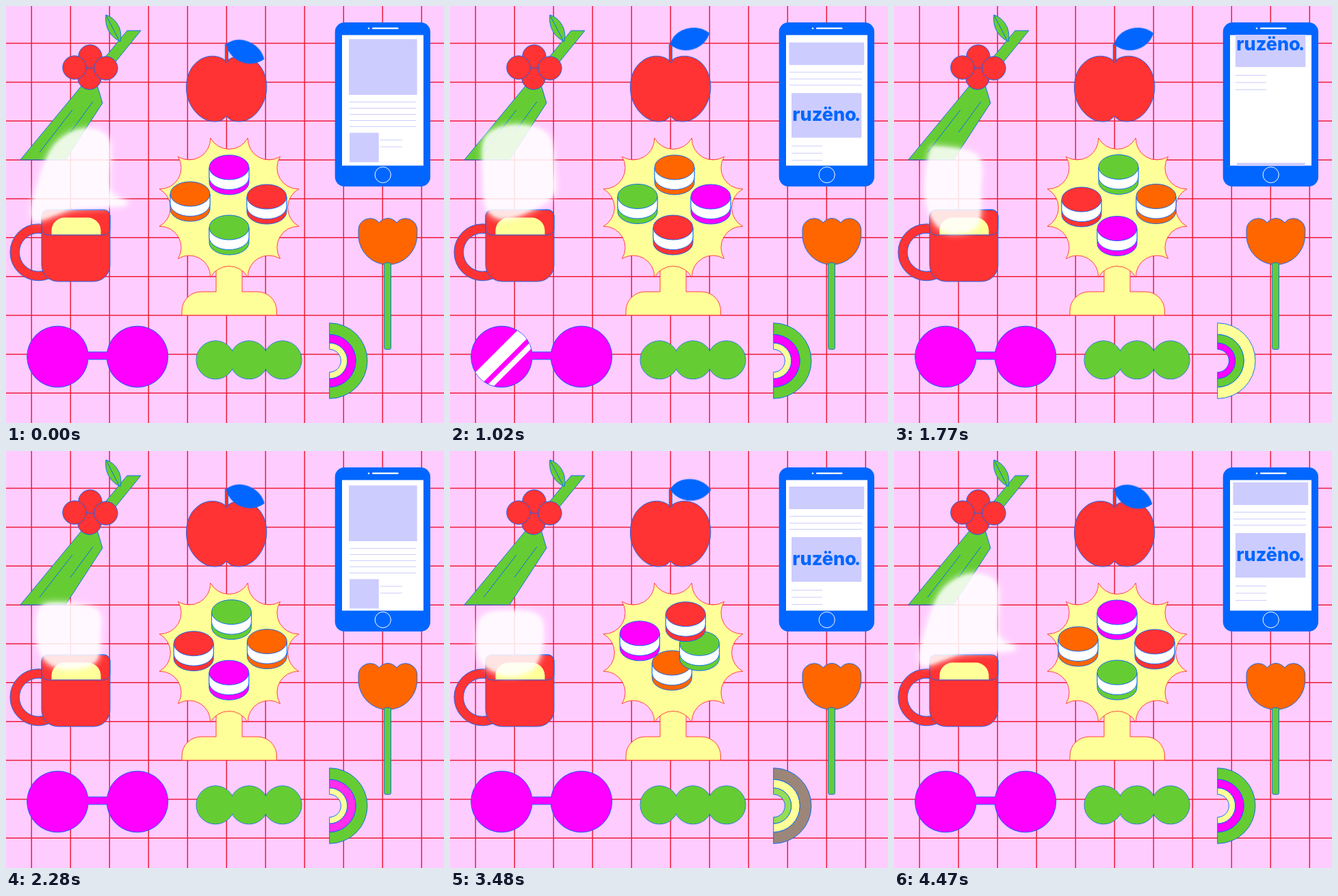
These frames come from a looping animation (640 px wide and 610 px high, 4.5 s). An HTML page:

```html
<!DOCTYPE html>
<html lang="en">
<head>
<meta charset="utf-8">
<title>Picnic stickers</title>
<style>
  html, body { margin: 0; width: 100%; height: 100%; overflow: hidden; background: #fcf; }
  svg { display: block; width: 640px; height: 610px; }
  .o { stroke: #06f; stroke-width: .9; }
  .red { fill: #f33; }
  .green { fill: #6c3; }
  .pink { fill: #f0f; }
  .blue { fill: #06f; }
  .cream { fill: #ff9; }
  .lilac { fill: #ccf; }
  .line { fill: none; stroke: #ccf; }
  .brand { font: 800 27px Inter, sans-serif; text-anchor: middle; }

  #leaf { transform-origin: 322px 56px; animation: flap 750ms infinite; }
  @keyframes flap {
    0% { transform: rotate(21.4deg); animation-timing-function: cubic-bezier(.37, 0, .63, 1); }
    36% { transform: rotate(-16deg); animation-timing-function: cubic-bezier(.37, 0, .63, 1); }
    96%, 100% { transform: rotate(21.4deg); }
  }

  #feed { animation: scroll 4500ms cubic-bezier(.37, 0, .63, 1) infinite; }
  @keyframes scroll {
    0%, 4.22% { transform: translateY(0); }
    25%, 31% { transform: translateY(-247px); }
    51.8%, 60% { transform: translateY(-524px); }
    79.3%, 100% { transform: translateY(-771px); }
  }

  #glint { animation: glint 2250ms linear infinite; }
  @keyframes glint {
    0%, 40% { transform: translateX(-120px); }
    54.667%, 100% { transform: translateX(210px); }
  }

  .arc { animation: 1125ms linear infinite; }
  #outer { animation-name: outer; }
  #middle { animation-name: middle; }
  #inner { animation-name: inner; }
  @keyframes outer {
    0%, 6.67% { fill: #6c3; }
    14.67%, 38.67% { fill: #f0f; }
    46.67%, 70.67% { fill: #ff9; }
    78.67%, 100% { fill: #6c3; }
  }
  @keyframes middle {
    0%, 1.33% { fill: #f0f; }
    9.33%, 37.33% { fill: #ff9; }
    45.33%, 70.67% { fill: #6c3; }
    78.67%, 100% { fill: #f0f; }
  }
  @keyframes inner {
    0%, 4% { fill: #ff9; }
    12%, 34.67% { fill: #6c3; }
    42.67%, 70.67% { fill: #f0f; }
    78.67%, 100% { fill: #ff9; }
  }
</style>
</head>
<body>
<svg viewBox="0 0 640 610">
  <defs>
    <clipPath id="screen"><rect x="491" y="42.5" width="119" height="191"/></clipPath>
    <clipPath id="lenses"><circle cx="75.5" cy="513" r="44.5"/><circle cx="192" cy="513" r="44.5"/></clipPath>
    <filter id="soft" x="-30%" y="-30%" width="160%" height="160%"><feGaussianBlur stdDeviation="4"/></filter>
    <filter id="core" x="-30%" y="-30%" width="160%" height="160%"><feGaussianBlur stdDeviation="2.2"/></filter>
  </defs>

  <rect width="640" height="610" fill="#fcf"/>
  <path id="grid" fill="none" stroke="#ee1c3c" stroke-width="1.5"/>

  <!-- branch -->
  <path class="o green" d="M21 225L177 36H197L133 115L141 142L87 225Z"/>
  <path class="o" fill="none" d="M49 214L97 152M94 185L127 140"/>
  <path class="o green" d="M146 13C161 18 171 34 167 52C150 44 144 28 146 13ZL165 50"/>
  <g class="o red">
    <circle cx="122" cy="105" r="17.2"/><circle cx="123" cy="74" r="17.2"/>
    <circle cx="100" cy="90" r="17.2"/><circle cx="146" cy="91" r="17.2"/>
  </g>

  <!-- apple -->
  <path class="o red" d="M322 81C312 71 292 70 279 82C262 95 260 125 268 141C275 157 290 170 306 169C313 169 318 166 322 161C326 166 331 169 340 169C356 169 369 157 376 141C384 125 383 97 366 82C352 70 332 71 322 81Z"/>
  <rect class="o red" x="320.3" y="56" width="4" height="26"/>
  <path id="leaf" class="o blue" d="M322 56C333 36 367 36 381 56C368 77 335 77 322 56Z"/>

  <!-- phone -->
  <rect class="blue" x="480.7" y="24" width="139.3" height="240" rx="14"/>
  <rect x="491" y="42.5" width="119" height="191" fill="#fff"/>
  <path d="M536 32.7H572.5" stroke="#fff" stroke-width="2.2" stroke-linecap="round"/>
  <circle cx="530" cy="32.7" r="1.3" fill="#fff"/>
  <circle cx="550.7" cy="247" r="11.6" fill="none" stroke="#fff"/>
  <g clip-path="url(#screen)">
    <g id="feed">
      <g id="page">
        <rect class="lilac" x="501" y="48.5" width="99.7" height="81.5"/>
        <path class="line" d="M502 140.5H599M502 149.5H599M502 158.5H599M502 167.5H599M502 176.5H599M547 196H579M547 206H579"/>
        <rect class="lilac" x="502" y="185.5" width="42.7" height="43"/>
        <rect class="lilac" x="495.5" y="293" width="109.7" height="33"/>
        <path class="line" d="M496 336.5H602M496 346.5H602M496 355.5H602M499 444.5H544M499 455H544M499 465.5H544"/>
        <rect class="lilac" x="499" y="367" width="102.3" height="65.3"/>
        <text class="brand blue" x="547" y="408">ruzëno</text>
        <circle class="blue" cx="595.5" cy="405.5" r="2.4"/>
      </g>
      <use href="#page" y="524"/>
    </g>
  </g>

  <!-- cake stand -->
  <g class="cream" stroke="#f33" stroke-width=".9">
    <path d="M307 370V418H285A28 28 0 0 0 257 446V452.3H395.5V446A28 28 0 0 0 367.5 418H345V370Z"/>
    <path id="burst"/>
  </g>
  <g id="macarons"></g>

  <!-- mug -->
  <circle cx="47.5" cy="360.3" r="34.7" fill="none" stroke="#f33" stroke-width="13.5"/>
  <g class="o" fill="none"><circle cx="47.5" cy="360.3" r="41.5"/><circle cx="47.5" cy="360.3" r="28"/></g>
  <path class="o red" d="M61 298H143A9 9 0 0 1 152 307V379A24 24 0 0 1 128 403H76A24 24 0 0 1 52 379V307A9 9 0 0 1 61 298Z"/>
  <path class="cream" d="M66.5 334.5V328A19 19 0 0 1 85.5 309.5H119.5A19 19 0 0 1 138.5 328V334.5Z"/>
  <rect class="o" fill="none" x="52" y="298" width="100" height="37" rx="9"/>
  <path class="steam" fill="#fff" stroke="#fff" stroke-width="7" opacity=".5" filter="url(#soft)"/>
  <path class="steam" fill="#fff" opacity=".74" filter="url(#core)"/>

  <!-- tulip -->
  <path class="o" fill="#f60" d="M515 327A17 17 0 0 1 532 310.7Q541 311 545 317Q551 310.5 558 310.5Q565 310.5 571 317Q575 311 584 310.7A17 17 0 0 1 600.7 327V337A42.9 43.5 0 0 1 515 337Z"/>
  <rect class="o green" x="552.6" y="375.7" width="9.8" height="126.6" rx="2"/>

  <!-- glasses -->
  <g class="o pink">
    <circle cx="75.5" cy="513" r="44.8"/><circle cx="192" cy="513" r="44.8"/>
    <rect x="119.8" y="506" width="28" height="11"/>
  </g>
  <path class="pink" d="M117 506.5H122V516.5H117ZM146 506.5H150V516.5H146Z"/>
  <g clip-path="url(#lenses)">
    <path id="glint" fill="#fff" d="M122 450h26l-130 130h-26zM158 450h11l-130 130h-11z"/>
  </g>

  <!-- beads -->
  <g class="o green"><circle cx="306" cy="517.8" r="28"/><circle cx="355" cy="517.8" r="28"/><circle cx="404" cy="517.8" r="28"/></g>
  <g class="green"><circle cx="306" cy="517.8" r="27.6"/><circle cx="355" cy="517.8" r="27.6"/><circle cx="404" cy="517.8" r="27.6"/></g>

  <!-- rainbow -->
  <path id="outer" class="o arc"/>
  <path id="middle" class="o arc"/>
  <path id="inner" class="o arc"/>
</svg>
<script>
  const $ = id => document.getElementById(id);
  const ease = p => (1 - Math.cos(Math.PI * p)) / 2;
  const mix = (a, b, p) => a + (b - a) * p;

  // Grid, burst and rainbow outlines
  let grid = '';
  for (let i = 0; i < 11; i++) {
    grid += `M${37.3 + 57 * i} 0V610M0 ${54.6 + 56.85 * i}H640`;
  }
  $('grid').setAttribute('d', grid);

  const tips = Array.from({ length: 12 }, (_, i) => {
    const a = (15 + 30 * i) * Math.PI / 180;
    return `${326 + 105.5 * Math.cos(a)} ${295 + 105.5 * Math.sin(a)}`;
  });
  $('burst').setAttribute('d', `M${tips[11]}` + tips.map(p => `A31 31 0 0 0 ${p}`).join('') + 'Z');

  const arc = (id, R, r) => $(id).setAttribute('d',
    `M472.7 ${519 - R}A${R} ${R} 0 0 1 472.7 ${519 + R}V${519 + r}A${r} ${r} 0 0 0 472.7 ${519 - r}Z`);
  arc('outer', 55.3, 38.5);
  arc('middle', 38.5, 26);
  arc('inner', 26, 16.7);

  // Macarons: one stop per beat; "seat" 0..3 is top, right, bottom, left
  const BEAT = 1125, MOVE = 375, LOOP = 4500;
  const macarons = [
    { color: '#f60', seat: 3, stops: [[269, 275], [328, 236], [383, 278.5], [328, 325]] },
    { color: '#6c3', seat: 2, stops: [[326, 324], [274, 278.5], [328, 235.5], [381, 278.5]] },
    { color: '#f0f', seat: 0, stops: [[326, 236], [381, 279], [326, 325.5], [274, 280]] },
    { color: '#f33', seat: 1, stops: [[381, 279], [326, 324], [274, 283], [328.5, 236]] }
  ];
  $('macarons').innerHTML = macarons.map(m => `<g class="o" fill="${m.color}">
    <path d="M-29 0V22A29 18 0 0 0 29 22V0Z"/>
    <path fill="#fff" d="M-29 1V14.5A29 18 0 0 0 29 14.5V1Z"/>
    <ellipse rx="29" ry="18"/></g>`).join('');
  const cakes = [...$('macarons').children];

  function placeMacarons(t) {
    const beat = Math.floor(t / BEAT);
    const s = ease(Math.min(1, t % BEAT / MOVE));
    macarons.forEach(({ seat, stops }, i) => {
      const p = stops[beat], q = stops[(beat + 1) % 4];
      const corner = (seat + beat) % 4 < 2 ? [q[0], p[1]] : [p[0], q[1]];
      const [x, y] = corner.map((c, k) => {
        const bend = mix(c, (p[k] + q[k]) / 2, .2);
        return mix(mix(p[k], bend, s), mix(bend, q[k], s), s);
      });
      cakes[i].setAttribute('transform', `translate(${x} ${y})`);
    });
  }

  // Steam: eight outline points per pose, clockwise from the lower left
  const poses = [
    [0, [40, 312, 50, 250, 72, 202, 112, 180, 150, 196, 152, 268, 176, 290, 100, 297]],
    [600, [58, 302, 52, 250, 52, 190, 98, 170, 142, 188, 157, 240, 168, 288, 110, 293]],
    [1020, [56, 300, 49, 250, 52, 192, 95, 174, 142, 188, 152, 240, 148, 280, 90, 310]],
    [1770, [58, 315, 46, 275, 52, 215, 68, 206, 122, 220, 126, 270, 122, 320, 85, 332]],
    [2730, [60, 302, 46, 280, 46, 246, 80, 235, 140, 242, 146, 270, 138, 298, 95, 308]],
    [3480, [52, 315, 40, 290, 46, 244, 85, 234, 130, 242, 135, 285, 120, 318, 85, 328]]
  ];
  poses.push([4470, poses[0][1]], [LOOP, poses[0][1]]);
  const steam = document.querySelectorAll('.steam');

  function drawSteam(t) {
    const i = poses.findIndex(p => p[0] > t);
    const [t0, a] = poses[i - 1], [t1, b] = poses[i];
    const s = ease((t - t0) / (t1 - t0));
    const v = a.map((n, k) => mix(n, b[k], s));
    const at = k => v[(k + 16) % 16];
    let d = `M${v[0]} ${v[1]}`;
    for (let k = 0; k < 16; k += 2) {
      const c1 = j => at(j) + (at(j + 2) - at(j - 2)) / 6;
      const c2 = j => at(j + 2) - (at(j + 4) - at(j)) / 6;
      d += `C${c1(k)} ${c1(k + 1)} ${c2(k)} ${c2(k + 1)} ${at(k + 2)} ${at(k + 3)}`;
    }
    steam.forEach(el => el.setAttribute('d', d + 'Z'));
  }

  let start;
  function frame(now) {
    start ??= now;
    const t = Math.max(0, now - start) % LOOP;
    placeMacarons(t);
    drawSteam(t);
    requestAnimationFrame(frame);
  }
  placeMacarons(0);
  drawSteam(0);
  requestAnimationFrame(frame);
</script>
</body>
</html>
```
